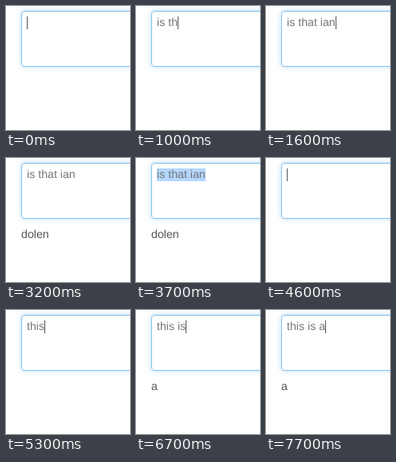
Animation, 155 px wide and 155 px high, one loop 8000 ms. Source, as an HTML page:

```html
<!DOCTYPE html>
<html lang="en">
<head>
<meta charset="utf-8">
<style>
html, body { margin: 0; width: 100%; height: 100%; overflow: hidden; background: #fff; }
body { position: relative; color: #555; font: 14.2px/16px "Liberation Sans", Arial, sans-serif; text-rendering: geometricPrecision; }
div, span { position: absolute; white-space: pre; }
#field { left: 19px; top: 6px; width: 160px; height: 68px; border: 1px solid #86c3f0; border-radius: 4px;
  box-shadow: inset 0 1px 1px rgba(0,0,0,.06), 0 0 6px rgba(102,175,233,.45); }
#typed { left: 26px; top: 13px; height: 16px; color: #777; }
#typed.selected { background: #b4d7ff; }
#caret { top: 13px; width: 1px; height: 16px; background: #555; }
#output { left: 19px; top: 88px; }
</style>
</head>
<body>
<div id="field"></div>
<span id="typed"></span>
<div id="caret"></div>
<span id="output"></span>
<script>
const LOOP = 8000;
const first = "is that ian", second = "this is a";
// [time, text, characters typed]
const typing = [
  [0, first, 0], [700, first, 2], [800, first, 3], [1000, first, 5], [1100, first, 8],
  [1400, first, 9], [1600, first, 11], [4100, second, 0], [5000, second, 2],
  [5200, second, 3], [5300, second, 4], [5500, second, 5], [5600, second, 6],
  [5800, second, 7], [7000, second, 8], [7100, second, 9]
];
const outputs = [[0, ""], [2600, "dolen"], [4600, ""], [6700, "a"]];
const caretOff = [[400, 700], [3200, 4100], [7500, 7700]];
const [typed, caret, output] = ["typed", "caret", "output"].map(id => document.getElementById(id));

const at = (steps, t) => steps.findLast(s => s[0] <= t);

function draw(now) {
  const t = now % LOOP;
  const [, text, count] = at(typing, t);
  typed.textContent = text.slice(0, count);
  typed.className = t >= 3700 && t < 4100 ? "selected" : "";
  output.textContent = at(outputs, t)[1];
  caret.style.left = Math.round(26 + typed.getBoundingClientRect().width) + "px";
  caret.hidden = caretOff.some(([from, to]) => t >= from && t < to);
}

const start = performance.now();
function tick() {
  draw(performance.now() - start);
  requestAnimationFrame(tick);
}
tick();
</script>
</body>
</html>
```
